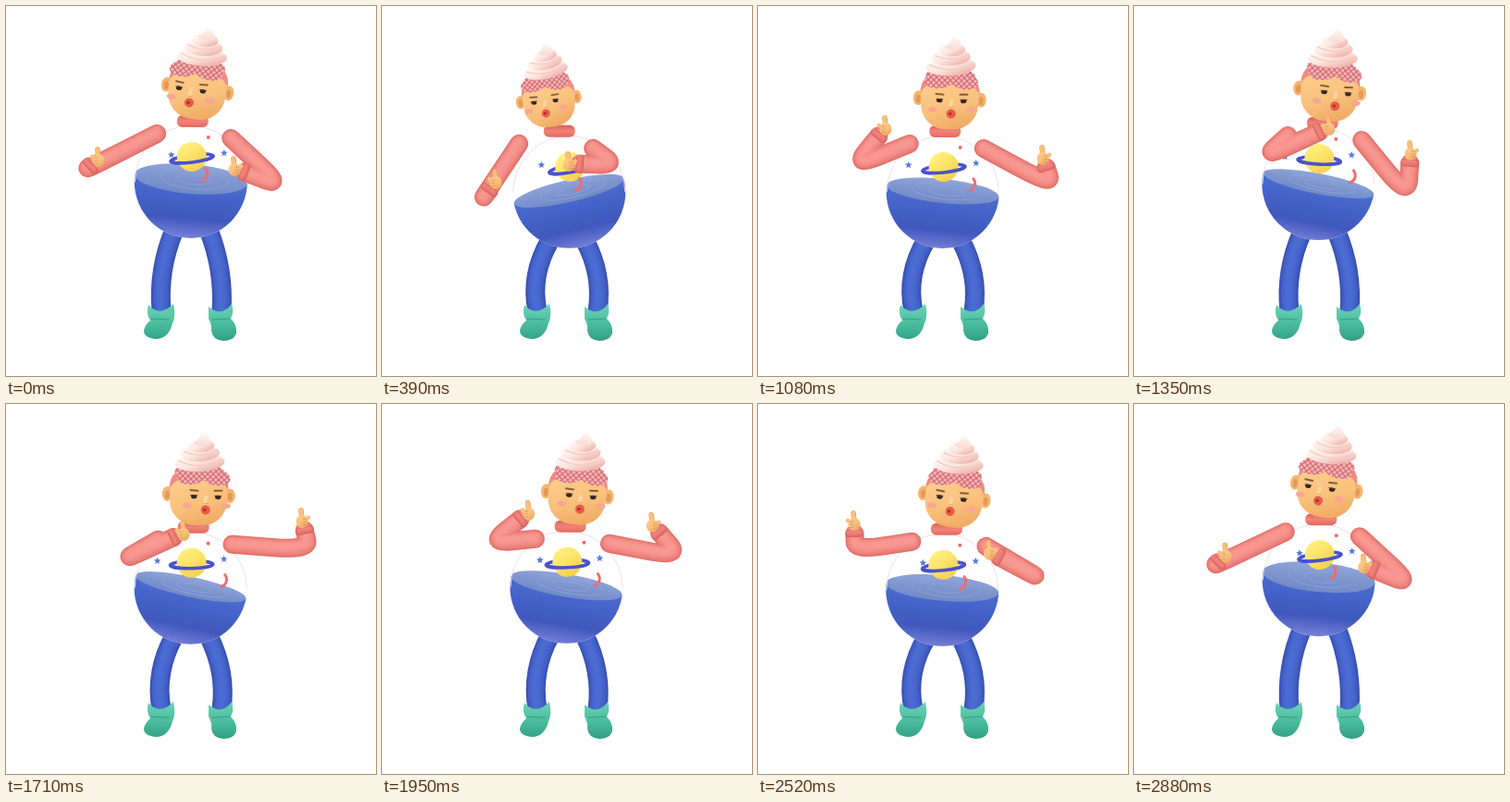
These frames come from a looping animation (400 by 400 pixels, 2.91 s). An HTML page with a canvas:

```html
<!DOCTYPE html>
<html lang="en">
<head>
<meta charset="utf-8">
<title>Dancing ice cream character</title>
<style>
html, body { margin: 0; width: 100%; height: 100%; overflow: hidden; background: #fff; }
canvas { display: block; }
</style>
</head>
<body>
<canvas id="stage" width="400" height="400"></canvas>
<script>
const c = document.getElementById('stage').getContext('2d');
const LOOP = 2910, STEP = 30, TAU = Math.PI * 2, RAD = Math.PI / 180;
const CORAL = ['#e2706b', '#fba097'], BLUE = ['#3850b2', '#4d70d8'];
const SKIN = '#f9c07c', SKIN_DARK = '#e39a58';

// Pose keys; every track has one row per time
const times = [0, 390, 810, 1080, 1350, 1710, 2190, 2550];
const tracks = {
  // x, tilt, face turn, scale
  head: [[206, 8, -7, 1], [181, -6, -5, .9], [202, 0, -4, 1], [207, 2, 2, 1],
    [211, 5, 7, 1], [208, 2, 8, 1], [213, 9, 0, 1], [211, 7, -3, 1]],
  // tilt, depth, offset
  liquid: [[5, 16, -3], [-13, 12, -1], [1, 15, -1], [6, 13, -1],
    [11, 11, 0], [12, 11, -1], [7, 14, -2], [5, 14, -2]],
  // star x, crescent x, ring tilt
  decor: [[-21, 17, -7], [-30, 12, -10], [-37, 29, -11], [-37, 34, -6],
    [-36, 39, 3], [-36, 38, -1], [-21, 31, -4], [-21, 24, -6]],
  // elbow x, y, hand x, y
  left: [[86, 177, 100, 164], [106, 212, 123, 188], [74, 167, 105, 115], [103, 174, 138, 130],
    [140, 164, 211, 130], [122, 171, 192, 138], [112, 133, 125, 97], [104, 160, 103, 130]],
  right: [[300, 196, 247, 174], [253, 172, 202, 169], [315, 183, 273, 158], [318, 194, 308, 162],
    [296, 206, 299, 157], [328, 158, 320, 124], [313, 182, 260, 141], [313, 194, 250, 160]]
};

// Smooth curve through the keys, closed over the loop
function sample(rows, t) {
  const n = times.length;
  const at = i => times[(i + n) % n] + Math.floor(i / n) * LOOP;
  const row = i => rows[(i + n) % n];
  let i = n - 1;
  while (times[i] > t) i--;
  const span = at(i + 1) - at(i), u = (t - at(i)) / span;
  return row(i).map((a, k) => {
    const b = row(i + 1)[k];
    const m0 = (b - row(i - 1)[k]) / (at(i + 1) - at(i - 1)) * span;
    const m1 = (row(i + 2)[k] - a) / (at(i + 2) - at(i)) * span;
    const u2 = u * u, u3 = u2 * u;
    return a * (2 * u3 - 3 * u2 + 1) + b * (3 * u2 - 2 * u3) +
      m0 * (u3 - 2 * u2 + u) + m1 * (u3 - u2);
  });
}

function shade(colors, x0, y0, x1, y1) {
  const g = c.createLinearGradient(x0, y0, x1, y1);
  colors.forEach((col, i) => g.addColorStop(i / (colors.length - 1), col));
  return g;
}
function oval(x, y, rx, ry, fill, tilt = 0) {
  c.beginPath();
  c.ellipse(x, y, rx, ry, tilt * RAD, 0, TAU);
  c.fillStyle = fill;
  c.fill();
}
function shape(d, fill) {
  c.fillStyle = fill;
  c.fill(new Path2D(d));
}
function line(x0, y0, x1, y1, color, width) {
  c.beginPath();
  c.moveTo(x0, y0);
  c.lineTo(x1, y1);
  c.strokeStyle = color;
  c.lineWidth = width;
  c.stroke();
}
function local(x, y, tilt, scale, draw) {
  c.save();
  c.translate(x, y);
  c.rotate(tilt * RAD);
  c.scale(scale, scale);
  draw();
  c.restore();
}

// Rounded tube: nested strokes running from dark to light
function tube(path, width, [dark, light]) {
  c.lineCap = c.lineJoin = 'round';
  c.save();
  for (let i = 0; i < 7; i++) {
    c.strokeStyle = i ? light : dark;
    c.globalAlpha = i ? .26 : 1;
    c.lineWidth = width * (1 - i * .125);
    c.stroke(path);
    c.translate(-.15, -.35);
  }
  c.restore();
}

function legs(d) {
  tube(new Path2D(`M182 ${242 + d}Q${164 - d * .4} ${285 + d / 2} 168 330`), 21, BLUE);
  tube(new Path2D(`M219 ${242 + d}Q${236 + d * .3} ${285 + d / 2} 233 330`), 21, BLUE);
  const teal = shade(['#6bd3b5', '#4cbf9f', '#329f86'], 0, 322, 0, 362);
  shape('M154 323Q166 337 181 322Q184 335 180 343Q176 359 163 360Q149 359 149 351Q150 345 156 340Q151 332 154 323Z', teal);
  shape('M219 325Q233 337 244 322Q247 331 243 338Q250 345 249 354Q246 362 235 362Q223 361 222 351Q223 345 219 338Z', teal);
  c.lineCap = 'round';
  line(157, 338, 176, 339, '#349e86', 1.2);
  line(223, 339, 242, 338, '#349e86', 1.2);
}

function star(x, y) {
  c.beginPath();
  for (let i = 0; i < 10; i++) {
    const r = i % 2 ? 1.8 : 4, a = i * Math.PI / 5 - Math.PI / 2;
    c.lineTo(x + r * Math.cos(a), y + r * Math.sin(a));
  }
  c.fillStyle = '#5878dc';
  c.fill();
}

function planet(x, y, tilt) {
  local(x, y, tilt, 1, () => {
    const ring = (from, to) => {
      c.beginPath();
      c.ellipse(0, 2, 23, 4, 0, from, to);
      c.lineWidth = 3.6;
      c.strokeStyle = '#4b51cc';
      c.stroke();
    };
    ring(0, TAU);
    oval(0, 0, 16, 16, shade(['#fff07f', '#fbe165', '#f5ce52'], -8, -14, 8, 15));
    ring(0, Math.PI);
  });
}

function body(x, y, [tilt, depth, level], [starX, moonX, ringTilt]) {
  local(x, y, 0, 1, () => {
    oval(0, 0, 61, 61, '#fff');
    c.save();
    c.clip();
    local(0, level, tilt, 1, () => {
      c.fillStyle = shade(['#4c6dd0', '#4462c7', '#4058bd', '#7880d8'], 0, 0, 0, 64);
      c.fillRect(-70, 0, 140, 80);
      oval(0, 0, 61, depth, shade(['#91a5d9', '#7e96cf', '#7189c8'], 0, -depth, 0, depth));
      c.strokeStyle = '#8fa3d6';
      c.lineWidth = .8;
      for (const k of [.35, .65]) {
        c.beginPath();
        c.ellipse(4, 0, 56 * k, depth * k, 0, 0, TAU);
        c.stroke();
      }
    });
    c.restore();
    c.beginPath();
    c.arc(0, 0, 60.5, Math.PI, TAU);
    c.strokeStyle = '#f1dfe5';
    c.lineWidth = 1;
    c.stroke();
    planet(1, -27, ringTilt);
    star(starX, -29);
    star(36, -31);
    oval(19, -48, 2, 2, '#f0686a');
    c.beginPath();
    c.arc(moonX - 7, -9, 8, -.7, 1.3);
    c.strokeStyle = '#ee6d70';
    c.lineWidth = 3;
    c.stroke();
  });
}

function waffle(turn) {
  c.save();
  c.beginPath();
  c.ellipse(0, -33, 27, 9, 0, 0, TAU);
  for (const s of [-13, 13]) {
    c.moveTo(s + turn + 16, -28);
    c.ellipse(s + turn, -28, 16, 9, s * .012, 0, TAU);
  }
  c.fillStyle = '#f8b6ae';
  c.fill();
  c.clip();
  for (let x = -70; x < 70; x += 6) {
    line(x, -44, x + 26, -18, '#d0677a', 1.1);
    line(x + 26, -44, x, -18, '#d0677a', 1.1);
  }
  c.restore();
}

function swirl() {
  const layers = [[0, -43, 27, 10], [0, -53, 21, 9], [1, -61, 14, 7]];
  for (const [x, y, rx, ry] of layers) {
    oval(x, y, rx, ry, shade(['#fff6f1', '#fde6df', '#efb9b1'], x - 4, y - ry, x + 4, y + ry), -5);
  }
  shape('M-8 -64Q-1 -68 0 -74Q5 -76 9 -70Q13 -65 8 -62Q0 -59 -8 -64Z',
    shade(['#fff8f4', '#f9d8d0'], 0, -75, 0, -60));
  c.strokeStyle = '#f4cbc4';
  c.lineWidth = 1.4;
  c.stroke(new Path2D('M-23 -44Q0 -34 23 -47M-17 -54Q2 -47 18 -57'));
}

function face(turn) {
  const cheek = '#f9a694', brow = '#865c3a';
  oval(turn - 20, 4, 5, 3, cheek);
  oval(turn + 22, 3, 5, 3, cheek);
  c.lineCap = 'round';
  for (const s of [-1, 1]) {
    const x = turn + s * 13;
    line(x - 4, -13, x + 4, -13 - s * .5, brow, 2);
    oval(x, -6, 3.2, 2.2, '#30252a');
    line(x - 3.5, -7.5, x + 3.5, -7.5, '#5a3b2c', 1);
  }
  line(turn, -6, turn - 1, 0, '#ffd59b', 4);
  line(turn - 2, 1, turn + 2, 1, '#e7a062', 1);
  oval(turn, 8, 5, 5, '#e95b47');
  oval(turn - 1, 8, 1.7, 1.6, '#a92e2c');
}

function head(x, y, [, tilt, turn, scale]) {
  local(x, y, tilt, scale, () => {
    for (const s of [-34, 34]) {
      oval(s, -8, 5.5, 8, '#f6b56f');
      oval(s, -7, 2.5, 4.5, SKIN_DARK);
    }
    c.beginPath();
    c.roundRect(-31, -34, 62, 59, [20, 20, 27, 27]);
    c.fillStyle = shade(['#fccb8a', SKIN, '#efa962'], -8, -24, 10, 26);
    c.fill();
    shape('M-32 -13Q-33 -39 0 -39Q33 -39 32 -13Q28 -22 20 -24L-20 -24Q-28 -22 -32 -13Z', '#f18b82');
    face(turn);
    waffle(turn * .6);
    swirl();
  });
}

function collar(x, y) {
  c.beginPath();
  c.roundRect(x - 17, y - 6, 34, 13, 6);
  c.fillStyle = shade(['#d9625b', '#f28378', '#e4685f'], x, y - 6, x, y + 7);
  c.fill();
}

function hand(x, y, side) {
  local(x, y, 0, 1, () => {
    c.lineCap = 'round';
    line(0, 0, -1, -9, SKIN_DARK, 5.5);
    line(0, 0, -1.3, -9, SKIN, 4.5);
    line(side * 3, 2, side * 7, -1, SKIN, 4.5);
    oval(0, 3, 6.5, 7, shade(['#fccb8a', SKIN, '#e9a25d'], -4, -4, 5, 10));
    for (const k of [0, 3, 6]) line(side, k, side * 4.5, k + .5, SKIN_DARK, 1);
  });
}

function arm(sx, sy, [ex, ey, hx, hy], side) {
  const mix = (a, b, k) => a + (b - a) * k;
  const len = Math.hypot(ex - hx, ey - hy) || 1;
  const dx = (ex - hx) / len, dy = (ey - hy) / len;
  const wx = hx + dx * 12, wy = hy + dy * 12 + 1;
  const path = new Path2D();
  path.moveTo(sx, sy);
  path.lineTo(mix(sx, ex, .55), mix(sy, ey, .55));
  path.quadraticCurveTo(ex, ey, mix(ex, wx, .5), mix(ey, wy, .5));
  path.lineTo(wx, wy);
  tube(path, 20, CORAL);
  const cuff = new Path2D();
  cuff.moveTo(wx - dy * 6, wy + dx * 6);
  cuff.lineTo(wx + dy * 6, wy - dx * 6);
  tube(cuff, 8, ['#d9605c', '#f58b82']);
  hand(hx, hy, side);
}

function draw(t) {
  const pose = {};
  for (const name in tracks) pose[name] = sample(tracks[name], t);
  const bob = 5.5 * (1 - Math.cos(TAU * 4 * t / LOOP));
  const headX = pose.head[0], sway = headX - 204;
  c.clearRect(0, 0, 400, 400);
  legs(bob);
  body(200 - sway * .1, 190 + bob, pose.liquid, pose.decor);
  collar(201 + sway * .4, 124 + bob);
  head(headX, 97.5 + bob, pose.head);
  arm(162 + sway * .6, 138 + bob, pose.left, -1);
  arm(242 + sway * .6, 143 + bob, pose.right, 1);
}

function tick() {
  const t = performance.now() % LOOP;
  draw(Math.floor(t / STEP) * STEP);
  requestAnimationFrame(tick);
}
tick();
</script>
</body>
</html>
```
